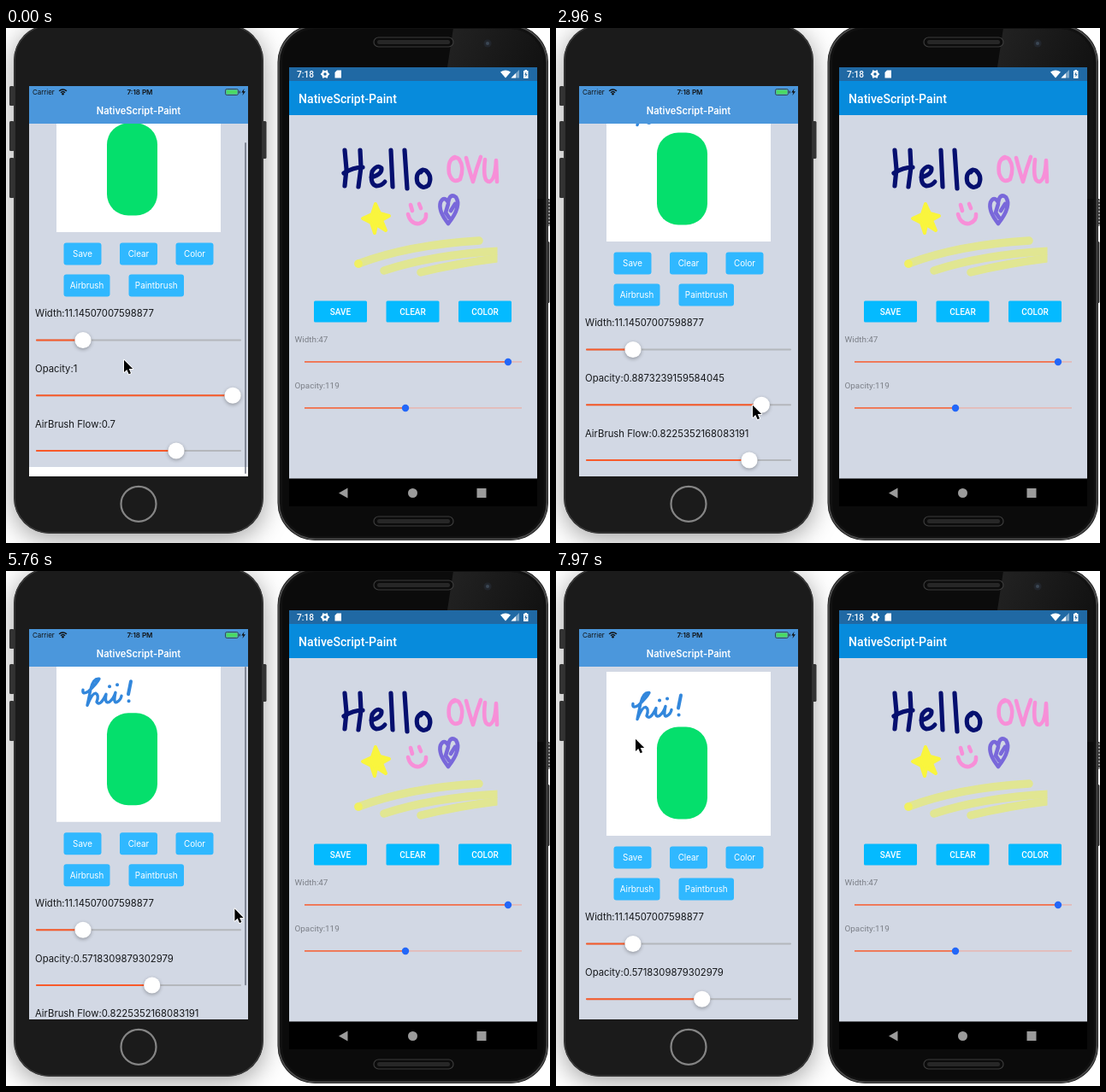
An HTML page with a canvas for the animation above (8000 ms loop, 636 px wide and 603 px high).

```html
<!DOCTYPE html>
<html lang="en">
<head>
<meta charset="utf-8">
<title>Paint demo</title>
<style>
html, body { margin: 0; width: 100%; height: 100%; overflow: hidden; background: #fff; }
canvas { display: block; width: 636px; height: 603px; }
</style>
</head>
<body>
<canvas id="stage" width="636" height="603"></canvas>
<script>
const ctx = document.getElementById('stage').getContext('2d');
const LOOP = 8000, TICK = 147.7;
const INTER = 'Inter, sans-serif', ROBOTO = 'Roboto, sans-serif';
const PAPER = '#d2d8e4';

// Keys are [tick, value...]; values run linearly between them.
const cursorKeys = [
  [1, 138, 388], [2, 146, 405], [3, 174, 452], [4, 194, 488], [6, 198, 500], [9, 199, 502],
  [10, 203, 503], [13, 226, 503], [14, 236, 470], [15, 250, 410], [16, 256, 380],
  [17, 257, 443], [18, 259, 444], [19, 259, 444], [20, 230, 441], [24, 162, 442], [25, 162, 442],
  [26, 152, 428], [28, 112, 352], [29, 108, 326], [30, 135, 320], [31, 165, 318],
  [32, 224, 330], [33, 267, 352], [34, 266, 354], [36, 265, 366], [41, 269, 414], [42, 269, 414],
  [44, 226, 404], [47, 131, 379], [49, 131, 379], [50, 113, 332], [51, 87, 268],
  [52, 78, 222], [53, 86, 195], [54, 93, 196]
];
const scrollKeys = [
  [1, -71], [2, -66], [3, -63], [4, -61], [6, -60], [33, -60], [34, -58.5], [36, -46.5],
  [38, -26], [41, 3.3], [42, 2.2], [44, .4], [45, 0]
];
const barKeys = [[5, 1], [8, 0], [33, 0], [34, 1], [42, 1], [46, 0]];
const opacityKeys = [[19, 1], [20, 315 / 355], [24, 203 / 355]];
const flowKeys = [[9, .7], [13, 292 / 355]];

function at(keys, n) {
  if (n <= keys[0][0]) return keys[0].slice(1);
  for (let i = 1; i < keys.length; i++) {
    const a = keys[i - 1], b = keys[i];
    if (n <= b[0]) {
      const k = (n - a[0]) / (b[0] - a[0]);
      return a.slice(1).map((v, j) => v + (b[j + 1] - v) * k);
    }
  }
  return keys[keys.length - 1].slice(1);
}

function rect(x, y, w, h, color) {
  ctx.fillStyle = color;
  ctx.fillRect(x, y, w, h);
}

function round(x, y, w, h, r, fill, line, width = 1) {
  ctx.beginPath();
  ctx.roundRect(x, y, w, h, r);
  if (fill) { ctx.fillStyle = fill; ctx.fill(); }
  if (line) { ctx.strokeStyle = line; ctx.lineWidth = width; ctx.stroke(); }
}

function disc(x, y, r, color) {
  ctx.beginPath();
  ctx.arc(x, y, r, 0, 7);
  ctx.fillStyle = color;
  ctx.fill();
}

function text(str, x, y, font, color, align = 'left') {
  ctx.font = font;
  ctx.fillStyle = color;
  ctx.textAlign = align;
  ctx.textBaseline = 'alphabetic';
  ctx.fillText(str, x, y);
}

function brush(d, color, width) {
  ctx.strokeStyle = color;
  ctx.lineWidth = width;
  ctx.lineCap = ctx.lineJoin = 'round';
  ctx.stroke(new Path2D(d));
  ctx.lineCap = 'butt';
}

function shape(d, color) {
  ctx.fillStyle = color;
  ctx.fill(new Path2D(d));
}

function shaded(color, blur, dy, draw) {
  ctx.save();
  ctx.shadowColor = color;
  ctx.shadowBlur = blur;
  ctx.shadowOffsetY = dy;
  draw();
  ctx.restore();
}

function wifi(x, y) {
  ctx.strokeStyle = '#111';
  ctx.lineWidth = 1.4;
  for (const r of [3.4, 6]) {
    ctx.beginPath();
    ctx.arc(x, y, r, -Math.PI * .76, -Math.PI * .24);
    ctx.stroke();
  }
  disc(x, y - .8, 1.3, '#111');
}

function lightPhone() {
  shaded('rgba(0,0,0,.38)', 30, 6, () => round(9, -4, 292, 596, 42, '#1b1b1b'));
  round(10, -3, 290, 594, 41, null, '#3a3a3a', 1.5);
  [[68, 23], [109, 35], [152, 47]].forEach(([y, h]) => round(4, y, 5.5, h, 1.5, '#333'));
  round(300, 109, 4.5, 44, 1.5, '#333');
  ctx.beginPath();
  ctx.arc(155, 557.3, 20.5, 0, 7);
  ctx.lineWidth = 2.2;
  ctx.strokeStyle = '#858585';
  ctx.stroke();
}

function header() {
  rect(27, 68, 256, 44, '#4b97dc');
  text('Carrier', 31, 78, '7.9px ' + INTER, '#111');
  wifi(66.5, 78);
  text('7:18 PM', 156.5, 78, '600 8px ' + INTER, '#111', 'center');
  round(256.5, 71.5, 15, 7, 1.8, null, '#333', .8);
  rect(257.5, 72.5, 13, 5, '#4cd964');
  rect(272.6, 73.6, 1.2, 2.8, '#333');
  shape('M278.6 71l-3.4 4.5h2.2l-1 3.5 3.6-4.7h-2.3z', '#111');
  text('NativeScript-Paint', 155, 101, '600 11.1px ' + INTER, '#fff', 'center');
}

function button(label, x, y, w) {
  round(x, y, w, 26, 3, '#30b8ff');
  text(label, x + w / 2, y + 16.6, '9.85px ' + INTER, '#fff', 'center');
}

function slider(y, v) {
  const x = 44.7 + 220.4 * v;
  round(35, y - .9, 240, 1.8, .9, '#b4b7bc');
  round(35, y - .9, x - 35, 1.8, .9, '#f85a2a');
  shaded('rgba(0,0,0,.3)', 4, 1.5, () => disc(x, y, 9.6, '#fff'));
}

function sketch() {
  round(59, 118.5, 192, 192, 0, '#fff');
  const blue = '#3287dc';
  brush('M90 156Q89 162 96 158Q106 149 109 143Q102 142 99 155L95 174Q101 159 105 160' +
    'Q109 162 106 170Q110 176 117 161Q115 173 121 170Q126 166 128 159Q125 173 130 170Q134 168 135 163', blue, 3.4);
  brush('M121 152h.1M130 150h.1M146 146L143 161M143.5 169h.1', blue, 4);
  round(118, 183, 59, 108, 25, '#05df6c');
}

function lightApp(n) {
  const [dy] = at(scrollKeys, n), [bar] = at(barKeys, n);
  const [opacity] = at(opacityKeys, n), [flow] = at(flowKeys, n);
  const snap = v => Math.fround(Math.round(v * 355) / 355);
  ctx.save();
  ctx.beginPath();
  ctx.rect(27, 112, 256, 413);
  ctx.clip();
  rect(27, 112, 256, 413, PAPER);
  ctx.save();
  ctx.translate(0, dy - .5);
  rect(27, 585.5, 256, 40, '#fff');
  sketch();
  button('Save', 67.5, 323, 44);
  button('Clear', 133, 323, 44);
  button('Color', 198.5, 323, 44);
  button('Airbrush', 67.5, 360, 54);
  button('Paintbrush', 143.5, 360, 64.5);
  const rows = [
    ['Width:11.14507007598877', .2055],
    ['Opacity:' + snap(opacity), snap(opacity)],
    ['AirBrush Flow:' + (n < 10 ? 0.7 : snap(flow)), flow]
  ];
  rows.forEach(([label, v], i) => {
    const y = 437 + i * 64.75;
    text(label, 34, y - 27.5, '11.3px ' + INTER, '#15171a');
    slider(y, v);
  });
  ctx.restore();
  if (bar > 0) {
    const over = Math.max(0, -60 - dy);
    const end = 522 - Math.max(0, Math.min(60, dy + 60)) * .84 - Math.max(0, dy);
    const top = Math.max(112, end - 399 + over);
    ctx.globalAlpha = bar;
    round(279, top, 2, end - top, 1, 'rgba(95,100,115,.7)');
    ctx.globalAlpha = 1;
  }
  ctx.restore();
  header();
}

function grille(y) {
  round(430, y, 93, 11, 5.5, '#0c0c0c', '#3c3c3c', 1.2);
  round(434, y + 3, 85, 5, 2.5, '#272727');
}

function darkPhone() {
  round(630, 200, 6, 32, 1.5, '#444');
  for (let y = 202; y < 231; y += 4) rect(633, y, 3, 1.5, '#aaa');
  round(630, 250, 5.5, 72, 1.5, '#333');
  round(317.5, -4, 316.5, 604, 44, '#111');
  round(319, -2.5, 313.5, 601, 43, null, '#4c4c4c', 1.8);
  round(323, 1, 305.5, 594, 39, '#0b0b0b');
  const gloss = ctx.createLinearGradient(520, 0, 625, 45);
  gloss.addColorStop(0, '#222');
  gloss.addColorStop(1, '#121212');
  ctx.save();
  ctx.beginPath();
  ctx.roundRect(323, 1, 305.5, 594, 39);
  ctx.clip();
  shape('M523 0H629V200H621V46H516Z', gloss);
  ctx.restore();
  grille(11);
  grille(572);
  disc(563, 18, 4.5, '#22262c');
  disc(563, 18, 2, '#3b4754');
}

function statusIcons() {
  text('7:18', 340, 58, '500 10.2px ' + ROBOTO, '#fff');
  ctx.strokeStyle = '#fff';
  ctx.lineWidth = 2.3;
  ctx.beginPath();
  ctx.arc(373, 54, 2.9, 0, 7);
  ctx.stroke();
  for (let i = 0; i < 6; i++) {
    const a = i * Math.PI / 3;
    disc(373 + 4.2 * Math.cos(a), 54 + 4.2 * Math.sin(a), 1, '#fff');
  }
  shape('M387 49.5h5v9h-7.5v-6.5z', '#fff');
  shape('M578 51.5Q584 47.5 590 51.5L584 58.5z', '#fff');
  shape('M600 49v9.5h-9.5z', 'rgba(255,255,255,.4)');
  shape('M596 53v5.5h-5.5z', '#fff');
  shape('M606.5 49h2.5v1h1.5v9h-5.5v-9h1.5z', '#fff');
  shape('M608.2 51l-2 3.7h1.3v3l2-3.7h-1.3z', '#2c6fa6');
}

function darkDrawing() {
  const navy = '#06106f', pink = '#f78fd8', khaki = '#e1e692';
  brush('M396 143L398 165L396 185M414 143L415 163L412 186M395 170Q406 163 417 163', navy, 5.2);
  brush('M427 175Q440 171 439 164Q434 159 428 168Q425 183 433 185Q439 185 443 180', navy, 5);
  brush('M450 143L452 186M466 143L469 188', navy, 5.2);
  brush('M487 166Q478 170 481 181Q487 190 494 184Q499 174 491 167Q487 165 485 169', navy, 5);
  brush('M525 151Q516 154 518 170Q522 183 531 177Q536 163 530 154Q527 150 523 153', pink, 4.6);
  brush('M538 152Q542 168 546 180Q550 164 555 151', pink, 4.6);
  brush('M560 154Q557 180 565 180Q572 178 573 155L574 180', pink, 4.6);
  const star = 'M432 206L437 217L448 220L439 225L444 237L433 230L431 240L427 228L417 223L428 218Z';
  shape(star, '#f9f53d');
  brush(star, '#f9f53d', 4);
  brush('M473 207L475 214M483 206L485 211M470 218Q473 230 483 229Q492 226 491 218', pink, 4.6);
  brush('M517 229Q505 214 508 204Q512 196 517 204Q519 193 526 198Q533 209 517 229M517 206L514 216L518 222M520 214L525 206', '#7968da', 4.6);
  ctx.save();
  ctx.beginPath();
  ctx.rect(337, 108, 237.5, 200);
  ctx.clip();
  brush('M412 276Q470 254 553 249', khaki, 9.5);
  brush('M442 284Q500 265 580 261', khaki, 9.5);
  brush('M485 286Q530 275 582 269', khaki, 9.5);
  disc(412, 276, 4.8, '#f0ef63');
  ctx.restore();
}

function darkApp() {
  rect(331, 46, 290, 514, '#000');
  rect(331, 102, 290, 425.5, PAPER);
  rect(331, 62, 290, 40, '#078bdc');
  rect(331, 46, 290, 16, '#2069a4');
  statusIcons();
  text('NativeScript-Paint', 342, 87.5, '500 14.1px ' + ROBOTO, '#fff');
  darkDrawing();
  [['SAVE', 360], ['CLEAR', 444.5], ['COLOR', 529]].forEach(([label, x]) => {
    round(x, 319.5, 62, 25, 1.5, '#04baff');
    text(label, x + 31, 335.7, '500 10px ' + ROBOTO, '#fff', 'center');
  });
  [['Width:47', 368, 391, 587], ['Opacity:119', 422, 445, 467]].forEach(([label, ty, y, x]) => {
    text(label, 337.5, ty, '9.9px ' + ROBOTO, '#7b7f87');
    rect(349, y - .8, 254, 1.4, '#e9b3ac');
    rect(349, y - .9, x - 349, 1.6, '#f26a42');
    disc(x, y, 4.2, '#2367f8');
  });
  shape('M389 544.5L399.5 538.5V550.5Z', '#9b9b9b');
  disc(475.5, 544.5, 5.5, '#9b9b9b');
  rect(550.5, 539, 11, 11, '#9b9b9b');
}

function pointer(x, y) {
  const arrow = new Path2D('M0 0V14.3L3.3 11.2L5.6 16.6L8 15.5L5.7 10.4H10.2Z');
  ctx.save();
  ctx.translate(x, y + .7);
  ctx.lineJoin = 'round';
  ctx.lineWidth = 1.8;
  ctx.strokeStyle = '#fff';
  ctx.stroke(arrow);
  ctx.fillStyle = '#000';
  ctx.fill(arrow);
  ctx.restore();
}

function frame() {
  const t = performance.now() % LOOP;
  const n = Math.floor((t + 8) / TICK);
  rect(0, 0, 636, 603, '#fff');
  lightPhone();
  darkPhone();
  lightApp(n);
  darkApp();
  pointer(...at(cursorKeys, n));
  requestAnimationFrame(frame);
}
frame();
</script>
</body>
</html>
```
